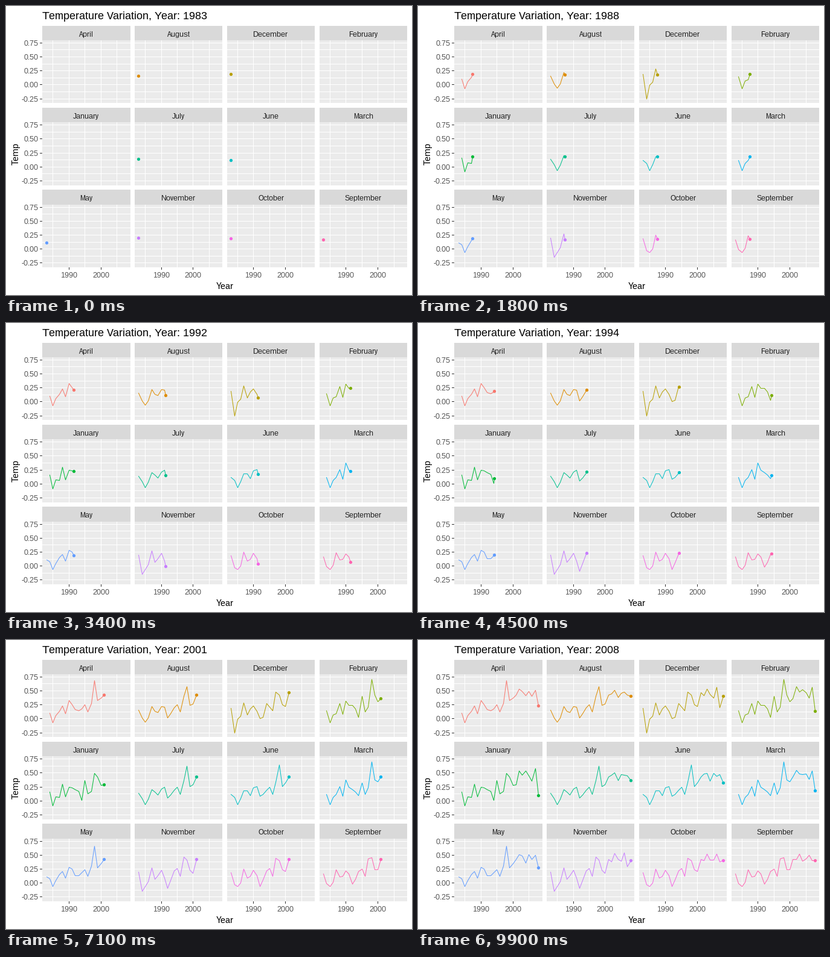
Recreate the animation shown at these times as a matplotlib script. Size 672 by 480 pixels, loop 10 s.

```python
import matplotlib.pyplot as plt
import numpy as np
from matplotlib.animation import FuncAnimation
from matplotlib.patches import Circle, Rectangle

W, H, DPI = 672, 480, 96
FRAMES, START, END = 100, 1983, 2008
LEFT, FLOOR = 60.0, 434.13           # left of first column, bottom of last row
PANEL_W, PANEL_H, STRIP_H = 145.52, 104.3, 24.4
COL_STEP, ROW_STEP = 152.85, 136.4
X_SCALE = PANEL_W / 27.5             # pixels per year
Y_SCALE = PANEL_H / 1.1231           # pixels per degree
Y_LOW = -0.333

MONTHS = ["January", "February", "March", "April", "May", "June", "July",
          "August", "September", "October", "November", "December"]
COLORS = ["#F8766D", "#DE8C00", "#B79F00", "#7CAE00", "#00BA38", "#00C08B",
          "#00BFC4", "#00B4F0", "#619CFF", "#C77CFF", "#F564E3", "#FF64B0"]

# Turning points of the one temperature curve that all months sample:
# years since 1980, degrees.
TURNS = np.array([
    (3.4, .11), (3.9, .20), (4.8, -.03), (4.95, -.27), (5.05, -.07),
    (5.9, -.06), (6.05, .08), (6.8, 0), (7.6, .22), (8.05, .30),
    (8.9, .06), (9.9, .13), (10.2, .38), (10.5, .21), (11.5, .26),
    (11.9, .08), (12.1, .25), (12.9, -.11), (13.05, .19), (14.1, 0),
    (14.3, .18), (14.9, .22), (15.1, .42), (15.3, .24), (15.9, .26),
    (16.05, .12), (16.9, .12), (17.7, .43), (18.05, .49), (18.13, .72),
    (18.6, .61), (18.75, .40), (19.1, .44), (19.4, .26), (19.9, .23),
    (20.3, .37), (20.9, .17), (21.2, .43), (21.9, .42), (22.1, .58),
    (22.9, .37), (23.05, .47), (24.1, .54), (24.4, .34), (25.4, .51),
    (26.05, .35), (27.05, .58), (27.8, .38), (28.05, .09), (28.6, .40),
])

plt.rcParams.update({
    "font.family": "Liberation Sans",
    "text.hinting": "native",
    "text.hinting_factor": 1,
})
fig = plt.figure(figsize=(W / DPI, H / DPI), dpi=DPI, facecolor="white")
ax = fig.add_axes([0, 0, 1, 1])
ax.set(xlim=(0, W), ylim=(H, 0))
ax.axis("off")


def px(pixels):
    """Font and line sizes in pixels to points."""
    return pixels * 72 / DPI


def box(x0, y0, x1, y1, color):
    x0, y0, x1, y1 = (round(v) for v in (x0, y0, x1, y1))
    ax.add_patch(Rectangle((x0, y0), x1 - x0, y1 - y0, fc=color, lw=0,
                           antialiased=False))


def label(x, y, text, size, color="black", ha="center", va="baseline", **kw):
    return ax.text(x, y, text, fontsize=px(size), color=color, ha=ha, va=va,
                   **kw)


def x_at(col, year):
    return LEFT + col * COL_STEP + (year - START + 1.25) * X_SCALE


def y_at(row, temp):
    return FLOOR - (2 - row) * ROW_STEP - (temp - Y_LOW) * Y_SCALE


def key_frame(year):
    return round((year - START) / (END - START) * (FRAMES - 1))


def month_series(month):
    """Yearly (year, temperature) points; records begin in May 1983."""
    m = MONTHS.index(month)
    years = np.arange(START if m >= 4 else START + 1, END + 1)
    temps = np.interp(years - 1980 + (m + 0.5) / 12, *TURNS.T)
    return list(zip(years, temps))


class Panel:
    """One month: strip title, grid, growing line and leading dot."""

    def __init__(self, index, month, color):
        self.row, self.col = divmod(index, 4)
        self.data = month_series(month)
        self.draw_back(month)
        self.line, = ax.plot([], [], color=color, lw=px(1))
        self.dot = ax.add_patch(Circle((0, 0), 2.6, fc=color, lw=0))

    def draw_back(self, month):
        x0 = LEFT + self.col * COL_STEP
        x1 = x0 + PANEL_W
        y1 = FLOOR - (2 - self.row) * ROW_STEP
        y0 = y1 - PANEL_H
        top = round(y0 - STRIP_H)
        box(x0, top, x1, y0, "#D9D9D9")
        box(x0, y0, x1, y1, "#EBEBEB")
        for year in range(1985, 2006, 5):
            x = round(x_at(self.col, year))
            box(x, y0, x + 1, y1, "white")
            if self.row == 2 and year % 10 == 0:
                box(x, y1, x + 1, y1 + 4, "#333333")
                label(x + 0.5, 451, str(year), 12, "#4D4D4D")
        for step in range(-2, 7):
            temp = step / 8
            y = round(y_at(self.row, temp))
            box(x0, y, x1, y + 1, "white")
            if self.col == 0 and step % 2 == 0:
                box(x0 - 4, y, x0, y + 1, "#333333")
                label(53.4, y + 5, f"{temp:.2f}", 12, "#4D4D4D", "right")
        label((x0 + x1) / 2, top + 18, month, 12, "#1A1A1A")

    def to_pixel(self, point):
        year, temp = point
        return (round(x_at(self.col, year)) + 0.5,
                round(y_at(self.row, temp)) + 0.5)

    def update(self, i):
        past = [p for p in self.data if key_frame(p[0]) <= i]
        self.dot.set_visible(bool(past))
        if not past:
            self.line.set_data([], [])
            return
        head = past[-1]
        if len(past) < len(self.data):
            nxt = self.data[len(past)]
            k0, k1 = key_frame(head[0]), key_frame(nxt[0])
            t = (i - k0) / (k1 - k0)
            head = tuple(a + t * (b - a) for a, b in zip(head, nxt))
        points = [self.to_pixel(p) for p in past + [head]]
        self.line.set_data(*zip(*points))
        self.dot.center = points[-1]


panels = [Panel(i, month, color)
          for i, (month, color) in enumerate(zip(sorted(MONTHS), COLORS))]

title = label(60.5, 22, "", 18, ha="left")
label(362, 470, "Year", 15)
label(24, 245, "Temp", 15, ha="right", va="center", rotation=90)


def update(i):
    year = START + (END - START) * i / (FRAMES - 1)
    title.set_text(f"Temperature Variation, Year: {year:.0f}")
    for panel in panels:
        panel.update(i)
    return []


anim = FuncAnimation(fig, update, frames=FRAMES, interval=100,
                     init_func=lambda: [], repeat=True, repeat_delay=0)
plt.show()
```
